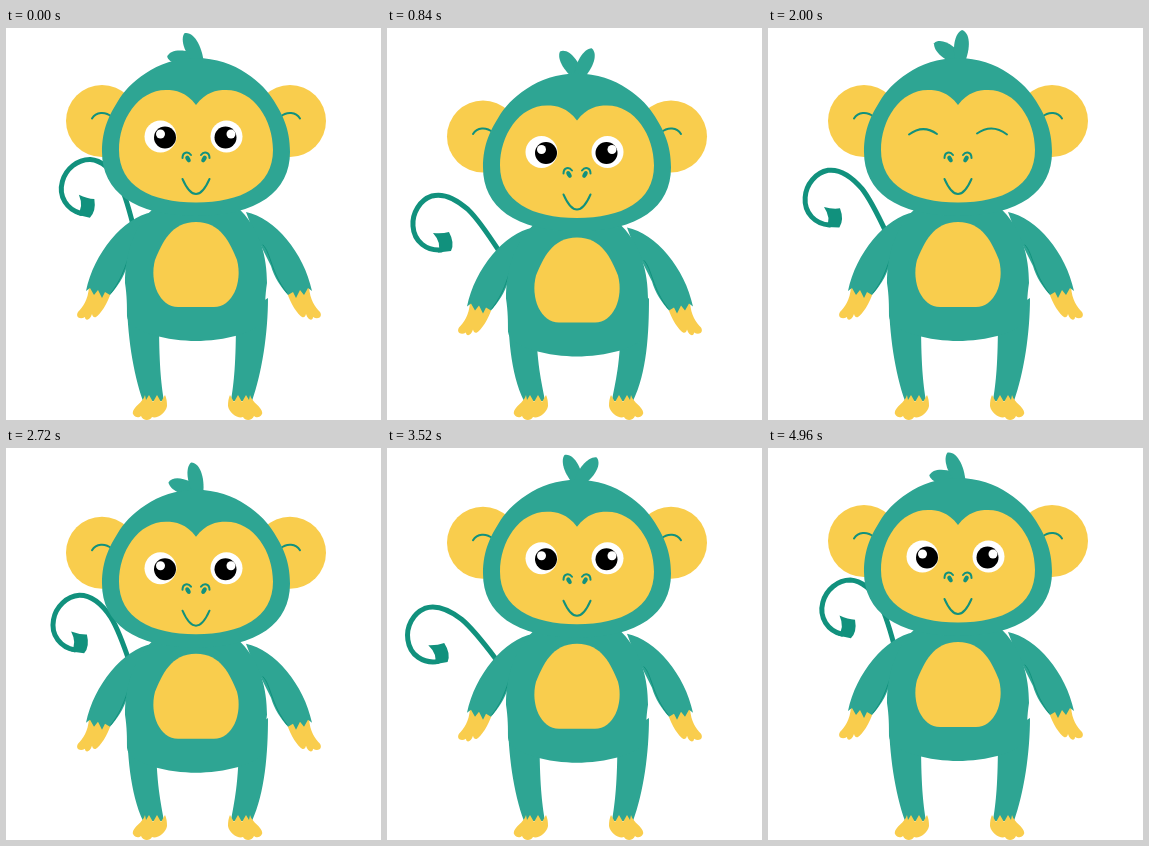
An HTML page for the animation above (5000 ms loop, 375 px wide and 392 px high).

```html
<!DOCTYPE html>
<html lang="en">
<head>
<meta charset="utf-8">
<title>Monkey</title>
<style>
html, body { margin: 0; width: 100%; height: 100%; overflow: hidden; background: #fff; }
svg { display: block; width: 375px; height: 392px; }
.teal { fill: #2ea593; }
.yellow { fill: #f9cd4d; }
.dark { fill: #11917d; }
.line { fill: none; stroke: #11917d; stroke-width: 2; stroke-linecap: round; }
.thin { stroke-width: 1; }
.thick { stroke-width: 5; }
</style>
</head>
<body>
<svg viewBox="0 0 375 392">
  <defs>
    <g id="leg">
      <path id="shin" class="teal"/>
      <path class="yellow" d="M139 367C137 375 125 380 127 386C129 390 133 390 135 388C137 393 144 393 146 389C151 391 160 385 161 378Q161 371 159 367L155 374L151 367L147 374L143 367L140 372Z"/>
    </g>
    <g id="arm">
      <path class="yellow" d="M83 259L105 264C102 275 94 287 90 289Q87 290 86 286C84 293 79 293 79 289C74 292 69 289 72 284C77 279 82 272 83 259Z"/>
      <path class="teal" d="M146 184C117 190 88 225 80 263L84 260L88 267L92 262L96 270L99 264L104 267C111 259 118 249 121 238L140 200Z"/>
      <path class="line thin" d="M129 217C121 225 121 245 105 265"/>
    </g>
    <g id="ear">
      <circle class="yellow" cx="96" cy="93" r="36"/>
      <path class="line" d="M86 90.500C90 84 99 83 106 89"/>
    </g>
    <g id="nostril">
      <path class="line" d="M176.500 130C176.500 124 182 123 185 127"/>
      <ellipse class="dark" cx="182" cy="131" rx="2.200" ry="3.600" transform="rotate(-30 182 131)"/>
    </g>
    <path id="leaf" class="teal" d="M-3 5C-10 -9 -9 -26 -2 -30C8 -28 9 -9 4 5Z"/>
  </defs>

  <g id="tailLift">
    <g id="tail">
      <path class="line thick" d="M130 229L112 206C101 189 91 174 81 164.500C68 153 56 148 45 151C33 155 25 168 26 181C27 197 40 206 54 205"/>
      <path class="dark" d="M46 188Q55 189 62 187Q68 198 64 206L51 207.500Q55 198 46 188Z"/>
    </g>
  </g>

  <use href="#leg"/>
  <use href="#leg" transform="translate(383) scale(-1 1)"/>

  <g id="upper">
    <use href="#arm"/>
    <use href="#arm" transform="translate(386) scale(-1 1)"/>
    <path class="teal" d="M150 178C125 200 119 230 119 255C121 268 121 278 121 288C122 305 165 313 190 313C215 313 258 305 259 288C259 278 259 268 261 255C261 230 255 200 230 178Z"/>
    <path class="yellow" d="M190 194C215 194 224 215 231 232C237 255 226 279 208 279L172 279C154 279 143 255 149 232C156 215 165 194 190 194Z"/>
    <use href="#ear"/>
    <use href="#ear" transform="translate(380) scale(-1 1)"/>
    <use href="#leaf" id="leafLeft"/>
    <use href="#leaf" id="leafRight"/>
    <path class="teal" d="M190 30C230 30 258 56 268 73C276 86 284 100 284 124C284 163 252 188 190 188C128 188 96 163 96 124C96 100 104 86 112 73C122 56 150 30 190 30Z"/>
    <path class="yellow" d="M190 77C180 64 170 62 160 62C132 62 113 92 113 122C113 158 145 174.500 190 174.500C235 174.500 267 158 267 122C267 92 248 62 220 62C210 62 200 64 190 77Z"/>
    <use href="#nostril"/>
    <use href="#nostril" transform="translate(380) scale(-1 1)"/>
    <path class="line" d="M176.500 151C180 159 185 166 190 166C195 166 200 159 203.500 151"/>
    <g id="open">
      <circle cx="154.500" cy="108.500" r="16" fill="#fff"/>
      <circle cx="220.500" cy="108.500" r="16" fill="#fff"/>
      <g id="lookLeft">
        <circle cx="159" cy="109.500" r="11"/>
        <circle cx="154.500" cy="106" r="4.500" fill="#fff"/>
      </g>
      <g id="lookRight">
        <circle cx="219.500" cy="109.500" r="11"/>
        <circle cx="225" cy="106" r="4.500" fill="#fff"/>
      </g>
    </g>
    <path id="closed" class="line" d="M141 106.500Q155 96 169 106M209 105.500Q224 95 239 106.500"/>
  </g>
</svg>
<script>
const LOOP = 5000, SWING = 2500;
const part = id => document.getElementById(id);
const move = (id, transform) => part(id).setAttribute('transform', transform);

// Smooth 0-1-0 hump around a moment.
const hump = (t, center, half) =>
  Math.abs(t - center) < half ? (1 + Math.cos(Math.PI * (t - center) / half)) / 2 : 0;

// The knee bends outward while the body sinks onto the planted foot.
const shin = bend =>
  `M121 270C121 305 ${127 - bend} 345 137 373L158 373C155 355 ${153 - bend} 335 ${153 - bend} 290Z`;

function draw(t) {
  const swing = 1 - Math.abs(1 - (t % SWING) / (SWING / 2));
  const bob = 16.3 * (hump(t, 740, 700) + hump(t, 2970, 700));
  const look = 5.5 * hump(t, 4270, 620);
  const smiling = t >= 1600 && t < 2240;

  move('upper', `translate(0 ${bob})`);
  move('tailLift', `translate(0 ${bob + 1.5})`);
  move('tail', `rotate(${19.5 - 29 * swing} 126 255)`);
  part('shin').setAttribute('d', shin(bob * 0.25));
  move('leafLeft', `translate(191 32) rotate(${-80 + 70 * swing})`);
  move('leafRight', `translate(192 32) rotate(${-23 + 77 * swing})`);
  move('lookLeft', `translate(${-look} 0)`);
  move('lookRight', `translate(${look} 0)`);
  part('open').style.display = smiling ? 'none' : '';
  part('closed').style.display = smiling ? '' : 'none';
}

function tick() {
  draw(performance.now() % LOOP);
  requestAnimationFrame(tick);
}
tick();
</script>
</body>
</html>
```
